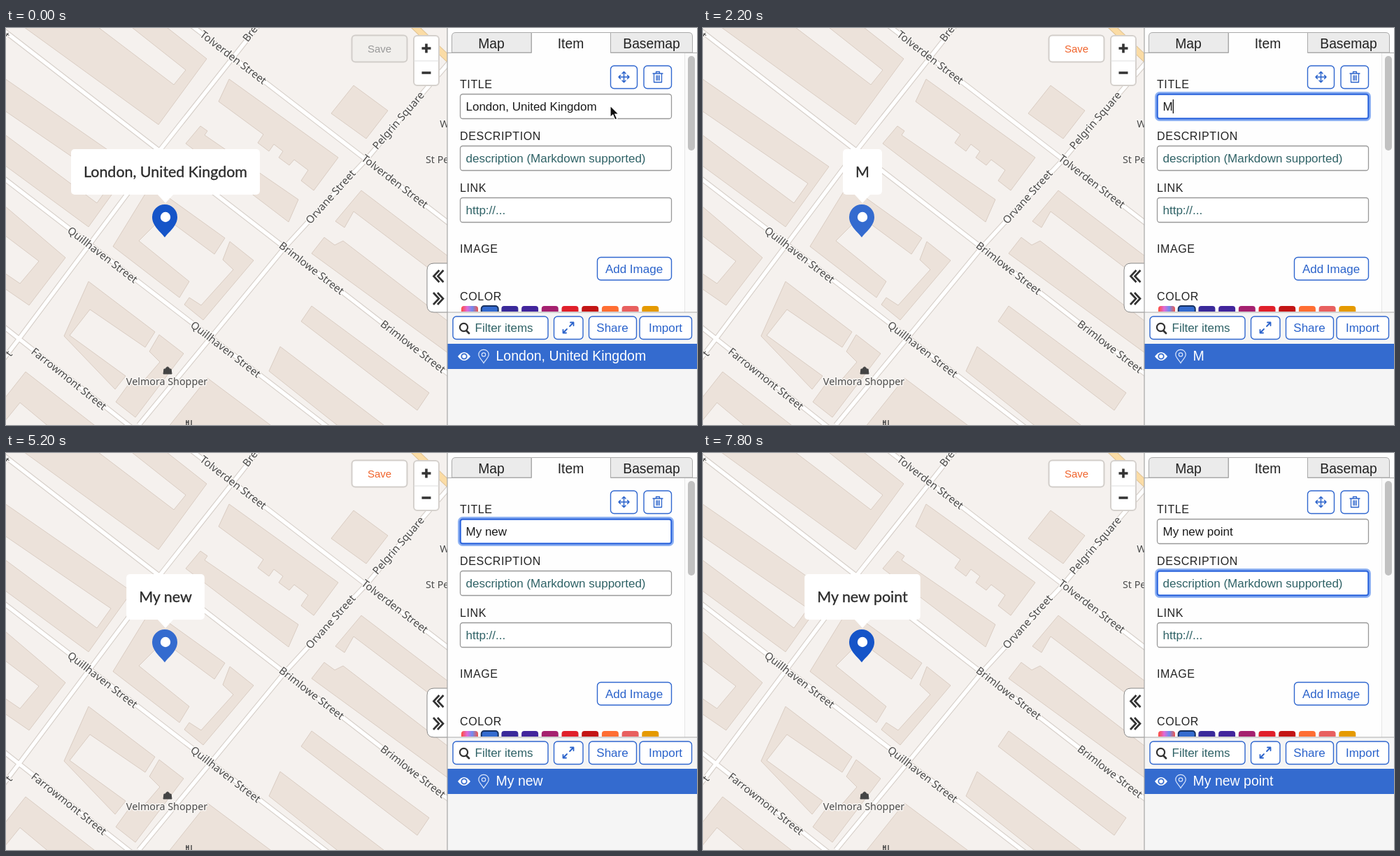
An HTML page that plays this animation: 988x567 px, repeating every 8000 ms.

```html
<!DOCTYPE html>
<html lang="en">
<head>
<meta charset="utf-8">
<title>Naming a map point</title>
<style>
html, body { margin: 0; width: 100%; height: 100%; overflow: hidden; background: #f5f1ee; }
svg { display: block; width: 988px; height: 567px; }
text { font: 17px "Liberation Sans", Arial, sans-serif; white-space: pre; }
.mid { text-anchor: middle; }
.tab { font-size: 19.3px; fill: #222; text-anchor: middle; }
.cap { font-size: 16px; letter-spacing: .6px; fill: #222; }
.hint { fill: #2f6266; }
.place { font: 15px "Noto Sans", "Open Sans", sans-serif; fill: #4a4a4a; stroke: #f8f5f2; stroke-width: 3px; paint-order: stroke; stroke-linejoin: round; }
.shop { font-size: 14.3px; font-weight: 500; }
.field { fill: #fff; stroke: #999; stroke-width: 1.3; }
.btn { fill: #fff; stroke: #3067cf; stroke-width: 1.4; }
.blue { fill: #2b63cb; text-anchor: middle; }
.line { fill: none; stroke: #2b63cb; stroke-width: 1.5; stroke-linecap: round; stroke-linejoin: round; }
.dark { fill: none; stroke: #333; stroke-width: 3.6; stroke-linecap: round; stroke-linejoin: round; }
#bubbleText { font: 21.45px Lato, sans-serif; fill: #2c2c2c; stroke: #2c2c2c; stroke-width: .35px; }
#buildings { fill: #ece2da; stroke: #d9ccc2; stroke-width: 1; fill-rule: evenodd; }
</style>
</head>
<body>
<svg viewBox="0 0 988 567">
<defs>
  <clipPath id="mapClip"><path d="M0 0H631V567H0Z"/></clipPath>
  <clipPath id="formClip"><path d="M631 36H988V405H631Z"/></clipPath>
  <linearGradient id="rainbow"><stop stop-color="#ff4b3c"/><stop offset=".35" stop-color="#e06ad8"/><stop offset=".65" stop-color="#6f8cf0"/><stop offset="1" stop-color="#f0564c"/></linearGradient>
  <path id="roads" fill="none" d="M365 -9L222 172L20 442L-6 476M190 567L398 314L465 241L515 188L561 133L645 36M-4 3L640 500M-4 214L460 570M262 -6L640 284M-4 426L180 571"/>
  <path id="chevron" d="M8 -8.500L0 0L8 8.500M14 -8.500L6 0L14 8.500"/>
</defs>

<g clip-path="url(#mapClip)">
  <rect width="632" height="567" fill="#f5f1ee"/>
  <g id="buildings">
    <path d="M22 -4L218 138L287 44L226 -4ZM128 -4L240 81L257 60L176 -4Z"/>
    <path d="M-2 72L180 198L118 284L-2 196ZM-2 118L150 222L130 250L-2 152Z"/>
    <path d="M-2 254L85 328L33 396L-2 372ZM-2 296L47 333L20 365L-2 350Z"/>
    <path d="M207 224L313 300L298 323L225 269L190 304L262 362L248 385L153 312Z"/>
    <path d="M320 305L354 332L282 417L255 395L262 385L279 396L325 345L310 331Z"/>
    <path d="M278 140L288 147L284 153L418 245L404 277L257 165Z"/>
    <path d="M319 73L475 185L440 232L422 218L432 203L412 188L405 196L390 185L396 176L383 166L376 176L360 164L368 152L304 105Z"/>
    <path d="M497 82L546 118L515 158L465 122Z"/>
    <path d="M508 232L640 332V370L497 262L484 285L471 276Z"/>
    <path d="M455 299L470 310L482 304L640 425V470L437 322Z"/>
    <path d="M437 397L605 521L588 546L422 419Z"/>
    <path d="M392 455L544 570H477L376 490Z"/>
    <path d="M288 500L382 570H232Z"/>
    <path d="M118 362L213 434L199 456L120 402L91 439L171 497L156 516L83 440Z"/>
    <path d="M219 438L254 465L185 556L157 534L178 505L190 512L220 477L205 462Z"/>
    <path d="M28 491L130 570H-2V529ZM20 535L62 570H-2V562Z"/>
  </g>
  <path d="M578 -8L645 56" fill="none" stroke="#dfc293" stroke-width="10"/>
  <use href="#roads" stroke="#d6cfc9" stroke-width="7.600"/>
  <use href="#roads" stroke="#fff" stroke-width="5.400"/>
  <path d="M578 -8L645 56" fill="none" stroke="#fbdca5" stroke-width="8"/>
  <g id="places"></g>
  <path d="M226 487H236L237 494H225ZM228.500 487V486Q231 482 233.500 486V487" fill="#444" stroke="#444"/>
  <path d="M258 560V567M261 560V567M265 560V567M257 563H261" stroke="#444" stroke-width="1.400"/>

  <g id="popup">
    <rect id="bubble" y="173" height="65" rx="5" fill="#fff"/>
    <path d="M216 237H240L228 250Z" fill="#fff"/>
    <text id="bubbleText" x="228" y="213" class="mid"></text>
  </g>
  <path id="pin" d="M227 299C222 292 209 283 209 270A18 18 0 0 1 245 270C245 283 232 292 227 299Z"/>
  <circle cx="228" cy="270" r="7.200" fill="#fff"/>

  <rect id="saveBox" x="494.500" y="10.500" width="79" height="38" rx="5" stroke="#d2ceca" stroke-width="2"/>
  <text id="save" x="534" y="34.500" class="mid" style="font-size:15px">Save</text>
  <rect x="583" y="11" width="36" height="71" rx="5" fill="#fff" stroke="#d5d1cd" stroke-width="2"/>
  <path d="M583 47H619" stroke="#ddd"/>
  <path d="M594.500 29H607.500M601 22.500V35.500M594.500 64H607.500" class="dark" style="stroke-linecap:butt"/>
  <path d="M632 336H612Q602 336 602 346V396Q602 406 612 406H632" fill="#fff" stroke="#888"/>
  <g class="dark" style="stroke-width:2.700;stroke-linecap:butt;stroke-linejoin:miter">
    <use href="#chevron" transform="translate(611.500 354.500)"/>
    <use href="#chevron" transform="translate(625 386.500) scale(-1 1)"/>
  </g>
</g>

<rect x="631" width="357" height="567" fill="#f5f5f5"/>
<rect x="631" y="0" width="357" height="406" fill="#fefefe"/>
<path d="M637.500 35V12Q637.500 6.500 643 6.500H751V35ZM864.500 35V6.500H976Q981.500 6.500 981.500 12V35Z" fill="#ebebeb" stroke="#aaa"/>
<path d="M631 35.500H751.500V6.500H864.500V35.500H988" fill="none" stroke="#aaa"/>
<text x="694" y="28.500" class="tab">Map</text>
<text x="807.500" y="28.500" class="tab">Item</text>
<text x="923" y="28.500" class="tab">Basemap</text>
<path d="M970 36H988V406H970Z" fill="#fafafa"/>
<path d="M970.500 36V406" stroke="#e6e6e6"/>
<rect x="975" y="40" width="10" height="135" rx="5" fill="#c1c1c1"/>

<g clip-path="url(#formClip)">
  <rect x="864.500" y="54" width="38" height="32.500" rx="5" class="btn"/>
  <rect x="912" y="54" width="39.500" height="32.500" rx="5" class="btn"/>
  <path class="line" d="M876 70H891M883.500 62.500V77.500M878.500 67.500L876 70L878.500 72.500M888.500 67.500L891 70L888.500 72.500M881 65L883.500 62.500L886 65M881 75L883.500 77.500L886 75"/>
  <path class="line" d="M925 65H939M929.500 65V62.500H934.500V65M926.500 65V77.500H937.500V65M930 68V74.500M932 68V74.500M934.200 68V74.500" style="stroke-width:1.3"/>
  <text x="649" y="86" class="cap">TITLE</text>
  <text x="649" y="160" class="cap">DESCRIPTION</text>
  <text x="649" y="234" class="cap">LINK</text>
  <text x="649" y="321" class="cap">IMAGE</text>
  <text x="649" y="389" class="cap">COLOR</text>
  <rect x="649.500" y="94.500" width="302" height="35" rx="3.500" class="field"/>
  <rect x="649.500" y="168.500" width="302" height="35" rx="3.500" class="field"/>
  <rect x="649.500" y="242.500" width="302" height="35" rx="3.500" class="field"/>
  <g id="ring" fill="none">
    <rect x="648.500" y="93.500" width="304" height="37" rx="4.500" stroke="#8fb2f2" stroke-width="5"/>
    <rect x="649.500" y="94.500" width="302" height="35" rx="3.500" stroke="#2c64dc" stroke-width="2"/>
  </g>
  <rect id="selection" y="102" height="20" fill="#a5cdf8"/>
  <text id="title" x="657.500" y="118" fill="#1a1a1a"></text>
  <text x="657.500" y="192" class="hint">description (Markdown supported)</text>
  <text x="657.500" y="266" class="hint">http://...</text>
  <rect id="caret" width="1.300" height="20" fill="#111"/>
  <rect x="845.500" y="327.500" width="106" height="32.500" rx="5" class="btn"/>
  <text x="898" y="349.500" class="blue">Add Image</text>
  <g id="swatches"></g>
</g>

<path d="M631 406H988" stroke="#aaa"/>
<g class="btn">
  <rect x="639" y="412" width="136" height="32.500" rx="5"/>
  <rect x="783.500" y="412" width="41.500" height="32.500" rx="5"/>
  <rect x="833.500" y="412" width="68" height="32.500" rx="5"/>
  <rect x="906" y="412" width="74.500" height="32.500" rx="5"/>
</g>
<path d="M658.500 432.500L662 436" class="dark" style="stroke-width:2.8"/>
<circle cx="654.500" cy="427.500" r="5.600" class="dark" style="stroke-width:2.2"/>
<text x="670.500" y="434" class="hint">Filter items</text>
<path class="line" d="M806 426L811.500 420.500M807 420.500H811.500V425M802 430L796.500 435.500M796.500 431V435.500H801" style="stroke-width:1.8"/>
<text x="867" y="434" class="blue">Share</text>
<text x="943" y="434" class="blue">Import</text>
<rect x="631" y="451" width="357" height="36" fill="#346bcf"/>
<path d="M646 469Q655 457 664 469Q655 481 646 469Z" fill="#fff"/>
<circle cx="655" cy="469" r="3.700" fill="#fff" stroke="#346bcf" stroke-width="1.800"/>
<path d="M683 478.500C680.500 474 675.800 470.500 675.800 466.500A7.200 7.200 0 0 1 690.200 466.500C690.200 470.500 685.500 474 683 478.500Z" fill="none" stroke="#dbe6fb" stroke-width="1.200"/>
<circle cx="683" cy="466.500" r="2.700" fill="none" stroke="#dbe6fb" stroke-width="1.200"/>
<text id="row" x="700.500" y="475" style="font-size:19.500px" fill="#fff"></text>
<path d="M631 0V567" stroke="#a5a5a5" stroke-width="1.200"/>

<path id="arrow" d="M0 0V16.500L3.800 13L6.800 20L9.800 18.700L6.800 12H12Z" fill="#111" stroke="#fff" stroke-width="1.200"/>
<path id="hand" d="M366 124L360 115Q360 111 364 113L365 114L362 108Q363 105 366 107L368 111L367 106Q369 103 371 106L372 110L373 106Q376 104 376 108V112Q379 109 379 113L376 124ZM366 107L369 113M371 106L372 112M376 109L375 113" fill="#fff" stroke="#222" stroke-width="1.400" stroke-linejoin="round"/>
</svg>

<script>
const $ = id => document.getElementById(id);
const LOOP = 8000, LEFT = 657.5;

function add(parent, tag, attrs, text = '') {
  const el = document.createElementNS('http://www.w3.org/2000/svg', tag);
  for (const key in attrs) el.setAttribute(key, attrs[key]);
  el.textContent = text;
  parent.append(el);
}

// text, centre, angle
[
  ['Tolverden Street', 325, 42, 37.5], ['Tolverden Street', 556, 219, 37.5],
  ['Brimlowe Street', 437, 343, 37.7], ['Brimlowe Street', 582, 455, 37.7],
  ['Quillhaven Street', 138, 324, 37.5], ['Quillhaven Street', 314, 459, 37.5],
  ['Farrowmont Street', 90, 501, 38.5],
  ['Orvane Street', 464, 241, -48], ['Pelgrin Square', 561, 132, -49],
  ['Bre', 349, 8, -52], ['t', 4, 465, -52], ['t', 1, 11, 37.7],
  ['W', 627, 137, 0], ['St Pedr', 624, 188, 0],
  ['Velmora Shopper', 230, 505, 0]
].forEach(([name, x, y, turn]) => add($('places'), 'text', {
  class: turn ? 'place mid' : 'place mid shop', dy: '.35em',
  transform: `translate(${x} ${y}) rotate(${turn})`
}, name));

['url(#rainbow)', '#346bcf', '#3a2a9a', '#42259c', '#a5216f', '#e0202b', '#c31515', '#ff6e33', '#e8605f', '#e59a00']
  .forEach((fill, i) => add($('swatches'), 'rect', {
    x: 651 + i * 28.7, y: 397, width: 24, height: 24, rx: 4, fill,
    stroke: i === 1 ? '#16305f' : 'none', 'stroke-width': 2
  }));

const typed = [
  [0, 'London, United Kingdom'], [2100, 'M'], [2400, 'My'], [2700, 'My n'], [3200, 'My ne'],
  [3500, 'My new'], [3700, 'My new '], [6100, 'My new po'], [6400, 'My new poin'], [6600, 'My new point']
];
const pointer = [
  [0, 864, 111], [500, 866, 113], [600, 867, 114], [800, 867, 109],
  [900, 868, 105], [1100, 760, 112], [1200, 500, 113]
];
const caretOn = [[2100, 4200], [4700, 5200], [5700, 7100], [7300, 7800]];

const latest = (steps, t) => steps.filter(step => step[0] <= t).pop();
const show = (id, on) => $(id).setAttribute('visibility', on ? 'visible' : 'hidden');
const set = (id, name, value) => $(id).setAttribute(name, value);

function setText(id, value) {
  if ($(id).textContent !== value) $(id).textContent = value;
  return $(id).getComputedTextLength();
}

function draw(t) {
  const value = latest(typed, t)[1];
  const end = LEFT + setText('title', value);
  setText('row', value);
  const wide = setText('bubbleText', value.trim()) + 36;
  set('bubble', 'x', 228 - wide / 2);
  set('bubble', 'width', wide);

  const edited = t >= 2100, inDescription = t >= 7300;
  set('pin', 'fill', edited && t < 6100 ? '#346bcf' : '#1554c8');
  set('saveBox', 'fill', edited ? '#fff' : '#f1efec');
  set('save', 'fill', edited ? '#f0642c' : '#9a9a9a');

  show('ring', t >= 1100);
  set('ring', 'transform', `translate(0 ${inDescription ? 74 : 0})`);
  show('caret', caretOn.some(([from, to]) => t >= from && t < to));
  set('caret', 'x', inDescription ? LEFT : end);
  set('caret', 'y', inDescription ? 176 : 102);

  const [, x, y] = latest(pointer, t);
  const start = Math.max(LEFT, x);
  show('selection', t >= 1100 && !edited);
  set('selection', 'x', start);
  set('selection', 'width', Math.max(0, end - start));
  show('arrow', t < 1300);
  set('arrow', 'transform', `translate(${x} ${y})`);
  show('hand', t >= 1300 && !edited);
}

const begin = performance.now();
function tick() {
  draw((performance.now() - begin) % LOOP);
  requestAnimationFrame(tick);
}
tick();
</script>
</body>
</html>
```
